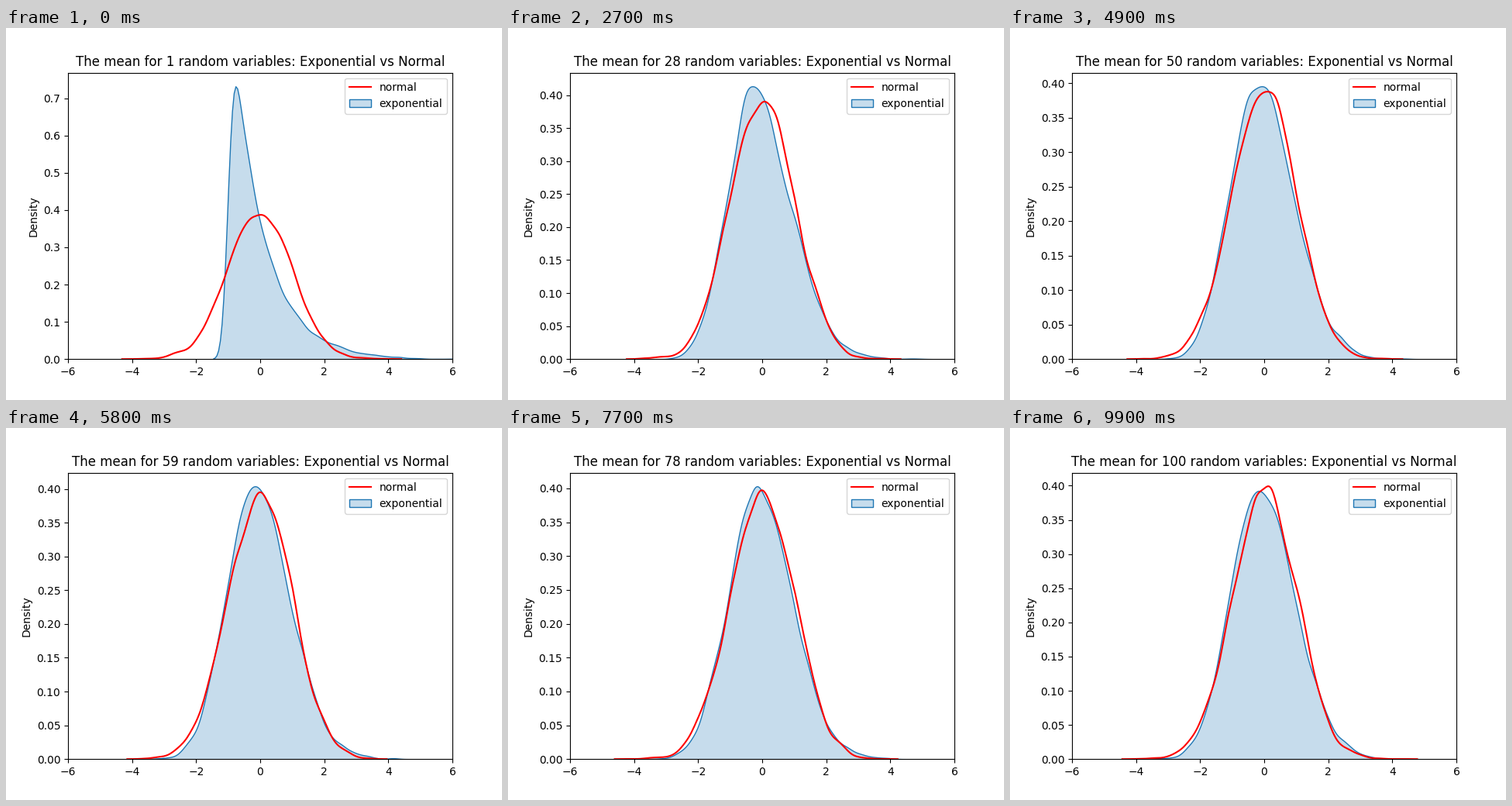
Write a matplotlib script that moves like this. It is 640x480 px and loops after 10000 ms.

```python
import numpy as np
import matplotlib.pyplot as plt
from matplotlib.animation import FuncAnimation

SIZE = 10000                 # draws behind each curve
STEP = 0.01                  # bin width of the fine histogram
EDGES = np.arange(-800, 1401) * STEP
CENTRES = EDGES[:-1] + STEP / 2


def kde(sample, points=200, cut=3):
    """Gaussian density estimate of a sample, with Scott's bandwidth."""
    width = sample.std() * SIZE ** -0.2
    t = np.arange(-80, 81) * STEP
    kernel = np.exp(-0.5 * (t / width) ** 2)
    counts, _ = np.histogram(sample, EDGES)
    density = np.convolve(counts, kernel / kernel.sum(), mode="same")
    x = np.linspace(sample.min() - cut * width,
                    sample.max() + cut * width, points)
    return x, np.interp(x, CENTRES, density / (SIZE * STEP))


def curves(n):
    """Normal draws against standardised means of n exponential draws."""
    rng = np.random.default_rng(n)
    normal = rng.standard_normal(SIZE)
    total = rng.standard_gamma(n, SIZE)    # sum of n exponentials
    return kde(normal), kde((total - n) / np.sqrt(n))


fig, ax = plt.subplots(figsize=(6.4, 4.8), dpi=100)


def draw(frame):
    n = frame + 1
    (x, normal), (u, means) = curves(n)
    ax.clear()
    ax.plot(x, normal, color="red", lw=1.5, label="normal")
    ax.fill_between(u, 0, means, facecolor=("C0", 0.25),
                    edgecolor="C0", lw=1, label="exponential")
    ax.set_xlim(-6, 6)
    ax.set_ylim(0, 1.05 * max(normal.max(), means.max()))
    ax.set_ylabel("Density")
    ax.set_title(f"The mean for {n} random variables: Exponential vs Normal")
    ax.legend(loc="upper right")
    return []


anim = FuncAnimation(fig, draw, frames=100, interval=100, repeat=True)
plt.show()
```
